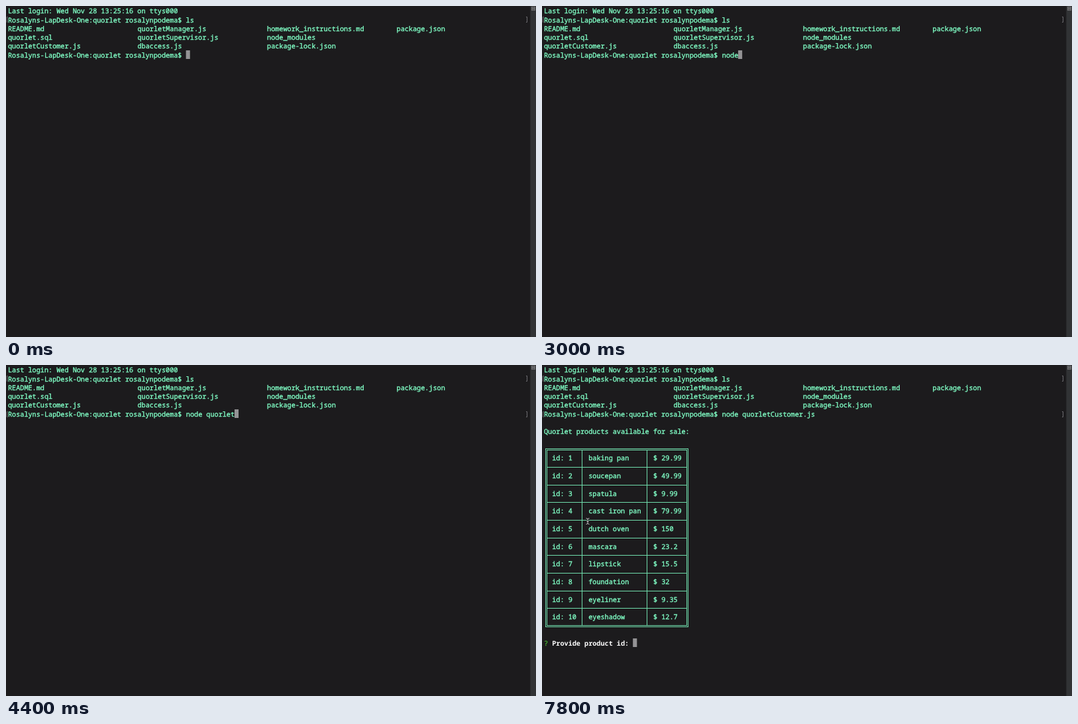
Recreate the animation shown at these times as an HTML page. Size 800x500 px, loop 8000 ms.

```html
<!DOCTYPE html>
<html lang="en">
<head>
<meta charset="utf-8">
<title>Terminal session</title>
<style>
  html, body { margin: 0; width: 100%; height: 100%; overflow: hidden; background: #1c1b1d; }
  svg { display: block; width: 800px; height: 500px; }
  text {
    font: 500 10.18px "Noto Sans Mono", "DejaVu Sans Mono", monospace;
    fill: #80ffc6;
    stroke: #80ffc6;
    stroke-width: 0.35px;
    white-space: pre;
    text-rendering: geometricPrecision;
  }
  .ask { font-weight: 700; fill: #fff; stroke: none; }
  .tick { fill: #43b02f; stroke: #43b02f; }
  .mark { fill: none; stroke: #6c6b6e; stroke-width: 1; }
  .rule { fill: none; stroke: #6fdcab; stroke-width: 1; }
</style>
</head>
<body>
<svg id="stage" viewBox="0 0 800 500"></svg>
<script>
const LOOP = 8000, CELL = 6.11, ROW = 13.32, LEFT = 3;
const PROMPT = "Rosalyns-LapDesk-One:quorlet rosalynpodema$ ";
const stage = document.getElementById("stage");

const colX = c => LEFT + c * CELL;
const rowY = r => r * ROW;

function add(tag, attrs, parent = stage) {
  const el = document.createElementNS("http://www.w3.org/2000/svg", tag);
  for (const key in attrs) el.setAttribute(key, attrs[key]);
  parent.appendChild(el);
  return el;
}

function write(col, row, str, parent = stage, cls = "") {
  const el = add("text", { x: colX(col), y: 11.2 + rowY(row), class: cls }, parent);
  el.textContent = str;
  return el;
}

function brackets(row, parent = stage) {
  const y = Math.round(rowY(row)) + 3.5;
  add("path", { class: "mark", d: `M2.5 ${y}H1.5V${y + 8}H2.5M785 ${y}H786.5V${y + 8}H785` }, parent);
}

// Window
const back = add("rect", { width: 792, height: 500 });
add("rect", { x: 792, width: 8, height: 500, fill: "#313335" });
add("rect", { x: 791, width: 1, height: 500, fill: "#29292b" });
add("rect", { x: 793.5, y: 1.5, width: 5, height: 5, fill: "#4b4c4e", stroke: "#6d6e70" });
add("path", { d: "M794 4H798", stroke: "#858688" });

// Directory listing
write(0, 0, "Last login: Wed Nov 28 13:25:16 on ttys000");
write(0, 1, PROMPT + "ls");
brackets(1);
const files = [
  ["README.md", "quorletManager.js", "homework_instructions.md", "package.json"],
  ["quorlet.sql", "quorletSupervisor.js", "node_modules"],
  ["quorletCustomer.js", "dbaccess.js", "package-lock.json"]
];
files.forEach((line, r) => line.forEach((name, c) => write(c * 32, r + 2, name)));

// Command line
write(0, 5, PROMPT);
const command = write(PROMPT.length, 5, "");
const marks = add("g", {});
brackets(5, marks);

// Program output
const output = add("g", {});
write(0, 7, "Quorlet products available for sale:", output);
const goods = [
  ["baking pan", "29.99"], ["soucepan", "49.99"], ["spatula", "9.99"],
  ["cast iron pan", "79.99"], ["dutch oven", "150"], ["mascara", "23.2"],
  ["lipstick", "15.5"], ["foundation", "32"], ["eyeliner", "9.35"], ["eyeshadow", "12.7"]
];
const ruleY = r => Math.round(7.4 + r * 13.33) + 0.5;
const top0 = ruleY(9), end = ruleY(29);
for (const d of [-1, 1]) {
  add("rect", {
    class: "rule", x: 6.5 + d, y: top0 + d, width: 213 - 2 * d, height: end - top0 - 2 * d
  }, output);
}
for (const x of [60.5, 158.5]) {
  add("path", { class: "rule", d: `M${x} ${top0 + 1}V${end - 1}` }, output);
}
goods.forEach(([name, price], i) => {
  const row = 10 + i * 2;
  write(2, row, "id: " + (i + 1), output);
  write(11, row, name, output);
  write(27, row, "$ " + price, output);
  if (i < goods.length - 1) {
    add("path", { class: "rule", d: `M7.5 ${ruleY(row + 1)}H218.5` }, output);
  }
});
write(0, 31, "?", output, "tick");
write(2, 31, "Provide product id:", output, "ask");

const cursor = add("rect", { width: 6.1, height: 13, fill: "#949395" });

// Text pointer
const pointer = add("g", { fill: "none" });
const beam = "M66.5 231.5Q69 231.5 69 233V239Q69 240.5 66.5 240.5M71.5 231.5Q69 231.5 69 233M69 239Q69 240.5 71.5 240.5M67.5 236.5H70.5";
add("path", { d: beam, stroke: "#111", "stroke-width": 2.4 }, pointer);
add("path", { d: beam, stroke: "#c9c7cb", "stroke-width": 1 }, pointer);

const typed = [
  [0, ""], [1400, "n"], [2200, "no"], [2400, "nod"], [2600, "node"], [3200, "node "],
  [3600, "node q"], [4200, "node quorlet"], [4800, "node quorletC"],
  [5400, "node quorletCustomer.js "]
];
const BELL = 4200, BELL_END = 4400, ENTER = 6200, PRINT = 6600, POINT = 7200;

const show = (el, on) => el.setAttribute("visibility", on ? "visible" : "hidden");

function draw(t) {
  const text = typed.filter(step => step[0] <= t).pop()[1];
  if (command.textContent !== text) command.textContent = text;

  let col = PROMPT.length + text.length, row = 5;
  if (t >= PRINT) { col = 22; row = 31; }
  else if (t >= ENTER) { col = 0; row = 6; }
  cursor.setAttribute("x", colX(col) - 0.2);
  cursor.setAttribute("y", Math.round(rowY(row) + 0.3));

  back.setAttribute("fill", t >= BELL && t < BELL_END ? "#2d2c2e" : "#1c1b1d");
  show(marks, t >= BELL);
  show(output, t >= PRINT);
  show(pointer, t >= POINT);
}

const start = performance.now();
function tick() {
  draw((performance.now() - start) % LOOP);
  requestAnimationFrame(tick);
}
draw(0);
requestAnimationFrame(tick);
</script>
</body>
</html>
```
